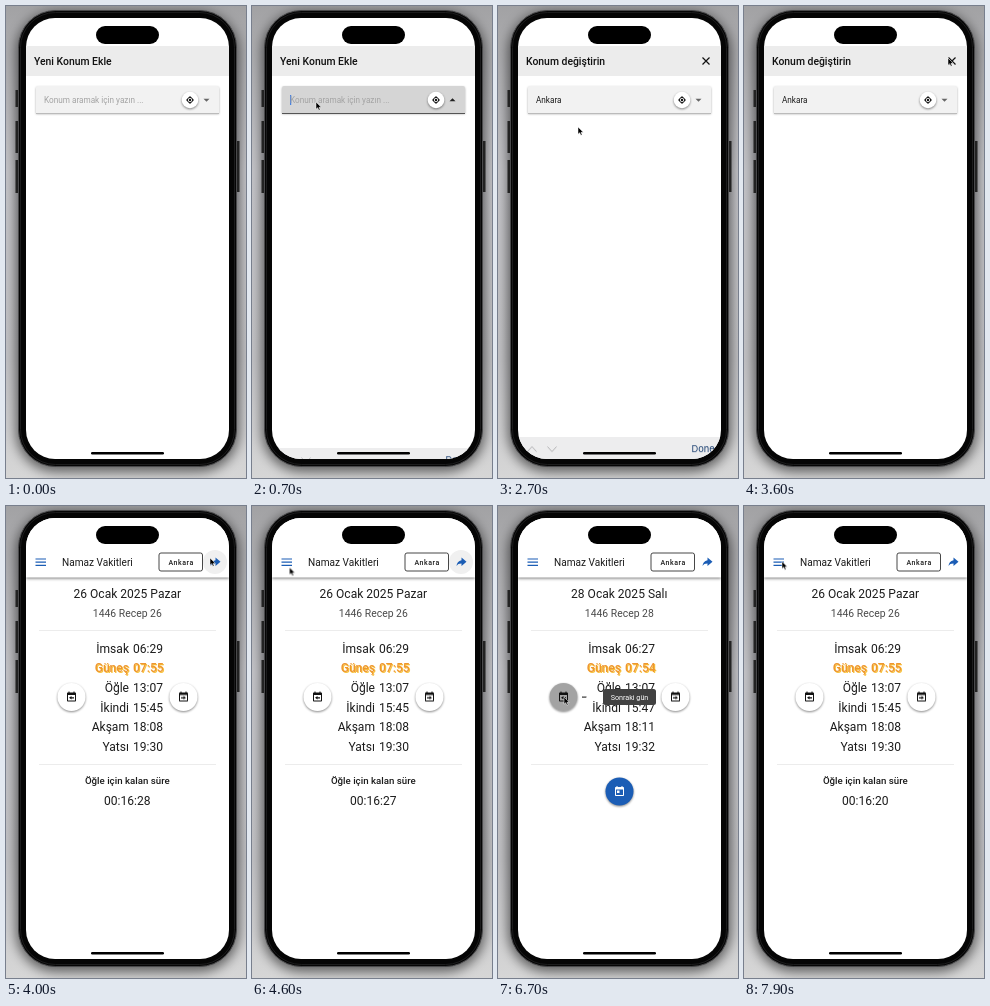
Write an HTML page that moves like this. It is 240 by 472 pixels and loops after 8000 ms.

```html
<!DOCTYPE html>
<html lang="tr">
<head>
<meta charset="utf-8">
<title>Namaz Vakitleri</title>
<style>
html, body { margin: 0; width: 100%; height: 100%; overflow: hidden; background: #bcbcc0; }
svg { display: block; }
#stage { width: 240px; height: 472px; }
text { font-family: Roboto, sans-serif; font-size: 8.2px; fill: #1c1c1c; white-space: pre; }
.mid { text-anchor: middle; }
.end { text-anchor: end; }
.title { font-size: 10.4px; font-weight: 500; fill: #111; }
.big { font-size: 12.05px; }
.sub { font-size: 6.9px; fill: #777; }
.tip { font-size: 7.2px; fill: #fff; }
.sun { font-weight: 500; fill: #ee9630; filter: drop-shadow(1px 1px .3px #f8c23c); }
.lift { filter: drop-shadow(0 1px 1.2px #0007); }
.rule { stroke: #ececec; }

/* on/off switches and moving parts share one 8 s clock */
.cut { animation: 8s step-end infinite; }
.move { animation: 8s linear infinite; }

#pick { animation-name: pick; }
@keyframes pick { 0% { opacity: 1 } 48.75%, 100% { opacity: 0 } }
#times { animation-name: times; }
@keyframes times { 0% { opacity: 0 } 48.75%, 100% { opacity: 1 } }
#add, #hint { animation-name: add; }
@keyframes add { 0% { opacity: 1 } 33.4%, 100% { opacity: 0 } }
#hint { animation-name: hint; }
@keyframes hint { 0% { opacity: 1 } 12.5%, 100% { opacity: 0 } }
#change { animation-name: change; }
@keyframes change { 0% { opacity: 0 } 33.4%, 100% { opacity: 1 } }
#typed { animation-name: typed; }
@keyframes typed { 0% { opacity: 0 } 12.5%, 100% { opacity: 1 } }
.focus { animation-name: focus; }
@keyframes focus { 0% { opacity: 0 } 7.5% { opacity: 1 } 33.4%, 100% { opacity: 0 } }
#list { animation-name: list; }
@keyframes list { 0% { opacity: 0 } 15% { opacity: 1 } 33.4%, 100% { opacity: 0 } }
#cover { animation-name: cover; }
@keyframes cover {
  0% { transform: translateX(0) } 12.5% { transform: translateX(5.4px) }
  13.75% { transform: translateX(9.9px) } 15.4% { transform: translateX(14.1px) }
  17.5% { transform: translateX(18.5px) } 19.4% { transform: translateX(21.3px) }
  21.2%, 100% { transform: translateX(25.8px) }
}
#caret { animation-name: caret; }
@keyframes caret { 0% { opacity: 1 } 25% { opacity: 0 } 28.1% { opacity: 1 } 31.2%, 100% { opacity: 0 } }
#bar { animation-name: bar; }
@keyframes bar {
  0%, 7.5% { transform: translateY(24px); animation-timing-function: ease-out }
  11.25%, 33.1% { transform: none; animation-timing-function: ease-in }
  36.9%, 100% { transform: translateY(24px) }
}
#halo { animation-name: halo; }
@keyframes halo { 0%, 62.5% { opacity: 1 } 65%, 100% { opacity: 0 } }
#left { animation-name: left; }
@keyframes left { 0%, 68.7% { opacity: 1 } 68.75%, 100% { opacity: 1 } }
#day26 { animation-name: day26; }
@keyframes day26 { 0% { opacity: 1 } 67.5% { opacity: 0 } 91.25%, 100% { opacity: 1 } }
#day27 { animation-name: day27; }
@keyframes day27 { 0% { opacity: 0 } 67.5% { opacity: 1 } 70%, 100% { opacity: 0 } }
#day28 { animation-name: day28; }
@keyframes day28 { 0% { opacity: 0 } 70% { opacity: 1 } 76.25% { opacity: 0 } 82.5% { opacity: 1 } 91.25%, 100% { opacity: 0 } }
#day29 { animation-name: day29; }
@keyframes day29 { 0% { opacity: 0 } 76.25% { opacity: 1 } 82.5%, 100% { opacity: 0 } }
#wait { animation-name: day26; }
#today { animation-name: today; }
@keyframes today { 0% { opacity: 0 } 67.5% { opacity: 1 } 91.25%, 100% { opacity: 0 } }
#ticks { animation: ticks 8s steps(16) -7.7s infinite; }
@keyframes ticks { to { transform: translateY(-320px) } }
#nextRip { animation-name: nextRip; }
@keyframes nextRip { 0%, 66.8% { opacity: 0 } 68.2%, 79% { opacity: .24 } 81.5%, 100% { opacity: 0 } }
#prevRip { animation-name: prevRip; }
@keyframes prevRip { 0%, 81.5% { opacity: 0 } 83%, 92% { opacity: .36 } 95.5%, 100% { opacity: 0 } }
#nextTip { transform-origin: 158px 191px; animation-name: nextTip; }
@keyframes nextTip {
  0%, 67% { transform: scale(0); opacity: 1 } 69%, 84% { transform: none; opacity: 1 }
  85.5%, 100% { transform: none; opacity: 0 }
}
#prevTip { transform-origin: 84px 191px; animation-name: prevTip; }
@keyframes prevTip {
  0%, 83.6% { transform: scale(0); opacity: 1 } 85.5%, 94% { transform: none; opacity: 1 }
  96%, 100% { transform: none; opacity: 0 }
}
#cursor { animation: cursor 8s ease-in-out infinite; }
@keyframes cursor {
  0%, 1% { transform: translate(-12px, 128px) }
  6.25%, 23.5% { transform: translate(64px, 96px) }
  31%, 41% { transform: translate(80px, 121px) }
  44%, 52% { transform: translate(204px, 52px) }
  56.25%, 63% { transform: translate(37.5px, 61.5px) }
  66.5%, 78% { transform: translate(178.5px, 188px) }
  81.5%, 96.5% { transform: translate(66px, 191px) }
  98.2%, 100% { transform: translate(38px, 55.5px) }
}
</style>
</head>
<body>
<svg id="stage" viewBox="0 0 240 472">
  <defs>
    <linearGradient id="wall" x2="0" y2="1">
      <stop offset="0" stop-color="#a2a2a4"/><stop offset=".35" stop-color="#c4c4c8"/>
      <stop offset=".75" stop-color="#c2c2c5"/><stop offset="1" stop-color="#d6d6d6"/>
    </linearGradient>
    <filter id="blur" x="-20%" y="-20%" width="140%" height="140%"><feGaussianBlur stdDeviation="6"/></filter>
    <clipPath id="screen"><rect x="20" y="12" width="203" height="441" rx="29"/></clipPath>
    <clipPath id="line"><rect x="90" y="284" width="64" height="20"/></clipPath>
    <path id="cal" d="M19 3h-1V1h-2v2H8V1H6v2H5c-1.1 0-2 .9-2 2v14c0 1.1.9 2 2 2h14c1.1 0 2-.9 2-2V5c0-1.1-.9-2-2-2zm0 16H5V8h14z"/>
    <path id="arrow" d="M7 12.3h5V10l5 3.6-5 3.6V15H7z"/>
  </defs>

  <rect width="240" height="472" fill="url(#wall)"/>
  <rect x="10" y="6" width="223" height="460" rx="40" fill="#000" opacity=".55" filter="url(#blur)"/>
  <path d="M11 84v17M11 115v32M11 154v33M232 135v51" stroke="#222" stroke-width="3"/>
  <rect x="12.5" y="4.5" width="218" height="456" rx="37" fill="#050505" stroke="#4a4a4c"/>
  <rect x="14.5" y="6.5" width="214" height="452" rx="35" fill="none" stroke="#1c1c1d"/>

  <g clip-path="url(#screen)">
    <rect x="20" y="12" width="203" height="441" fill="#fff"/>

    <g id="pick" class="cut">
      <rect x="20" y="40" width="203" height="30" fill="#ececec"/>
      <text id="add" class="title cut" x="28" y="58.5">Yeni Konum Ekle</text>
      <g id="change" class="cut">
        <text class="title" x="28" y="58.5">Konum değiştirin</text>
        <path d="M204.500 51.500l7 7m0-7l-7 7" stroke="#111" stroke-width="1.2"/>
      </g>

      <g style="filter:drop-shadow(0 1px .8px #0005)">
        <path d="M30 107V82q0-2 2-2h179q2 0 2 2v25z" fill="#f2f2f2"/>
      </g>
      <path d="M30 107.500h183" stroke="#bbb"/>
      <g class="focus cut">
        <path d="M30 107V82q0-2 2-2h179q2 0 2 2v25z" fill="#d5d5d5"/>
        <path d="M30 107.500h183" stroke="#555"/>
      </g>
      <text id="typed" class="cut" x="38" y="96.700">Ankara</text>
      <g class="focus cut">
        <g id="cover" class="cut">
          <rect x="38.200" y="86" width="32" height="16" fill="#d5d5d5"/>
          <path id="caret" class="cut" d="M38.700 89v10" stroke="#2a6fe0"/>
        </g>
      </g>
      <text id="hint" class="cut" x="38" y="96.700" style="fill:#a3a3a3">Konum aramak için yazın ...</text>

      <circle class="lift" cx="184" cy="94" r="8.300" fill="#fff"/>
      <circle cx="184" cy="94" r="2.600" fill="none" stroke="#111"/>
      <circle cx="184" cy="94" r="1.200" fill="#111"/>
      <path d="M184 90v1.500m0 5V98m-4-4h1.500m5 0h1.500" stroke="#111" stroke-width=".9"/>
      <path id="add2" d="M197.500 92.700h6l-3 3z" fill="#666"/>
      <g class="focus cut">
        <rect x="196" y="91" width="9" height="6" fill="#d5d5d5"/>
        <path d="M197.500 95.300h6l-3-3z" fill="#222"/>
      </g>

      <g id="list" class="cut">
        <rect class="lift" x="30" y="109" width="183" height="80" rx="2" fill="#fff"/>
        <text x="38" y="123">Ankara, Ankara</text>
        <text class="sub" x="38" y="132.500">Turkiye</text>
        <path d="M64.500 127.500q2-1 4.500 0t4 0v5.500q-2 1-4 0t-4.500 0z" fill="#c8663a"/>
        <circle cx="68" cy="130.200" r="1.300" fill="#f2d9c8"/>
        <text x="38" y="147.200">Ankaran, Ankaran</text>
        <text class="sub" x="38" y="156.800">Slovenya</text>
        <text x="38" y="171.400">Ankaran, Ankaran Municipality</text>
        <text class="sub" x="38" y="181">Slovenya</text>
        <g id="flag">
          <path d="M69.500 152.500h8.500" stroke="#c9c9d2" stroke-width="2"/>
          <path d="M69.500 154.500h8.500" stroke="#3560b0" stroke-width="2"/>
          <path d="M69.500 156.500h8.500" stroke="#c4585a" stroke-width="2"/>
        </g>
        <use href="#flag" y="24.200"/>
      </g>

      <g id="bar" class="move">
        <rect x="20" y="430" width="203" height="24" fill="#ededee"/>
        <path d="M29.500 444.500l4.500-5 4.500 5M49.500 439.500l4.500 5 4.500-5" fill="none" stroke="#b4b4b6"/>
        <text x="193.500" y="445" style="font:9.300px Inter,sans-serif;fill:#1b3f70">Done</text>
      </g>
    </g>

    <g id="times" class="cut">
      <rect x="20" y="40" width="203" height="31.500" fill="#fff" style="filter:drop-shadow(0 1px 1.500px #0008)"/>
      <rect x="20" y="12" width="203" height="30" fill="#fff"/>
      <path d="M29.500 53h10.500m-10.500 3.200h10.500m-10.500 3.200h10.500" stroke="#1b5db5" stroke-width="1.200"/>
      <text x="56" y="59.500" style="font-size:10.100px">Namaz Vakitleri</text>
      <rect x="153" y="47" width="43.500" height="18" rx="2" fill="#fff" stroke="#333" stroke-width=".9"/>
      <text class="mid" x="175.200" y="58.600" style="font-size:7px;font-weight:500;letter-spacing:.6px">Ankara</text>
      <circle id="halo" class="move" cx="209" cy="56" r="12" fill="#f0f0f0"/>
      <path d="M209.500 51.500l5 4.300-5 4.300v-2.600c-2.600 0-4 .8-5 2.500.3-2.700 1.900-5.300 5-5.800z" fill="#1b5db5"/>

      <path class="rule" d="M33 124.500h177M33 258.500h177"/>
      <g id="rows"></g>

      <g id="wait" class="cut">
        <text class="mid" x="121.300" y="278" style="font-size:9.700px;font-weight:500">Öğle için kalan süre</text>
        <g clip-path="url(#line)"><g id="ticks"></g></g>
      </g>
      <g id="today" class="cut">
        <circle class="lift" cx="121.500" cy="285.500" r="14" fill="#1b5db5"/>
        <g transform="translate(115.500 279.500) scale(.5)" fill="#fff"><use href="#cal"/><path d="M7 10h5v5H7z"/></g>
      </g>

      <circle class="lift" cx="65.500" cy="191" r="14" fill="#fff"/>
      <circle id="prevRip" class="move" cx="65.500" cy="191" r="14"/>
      <g transform="translate(59.500 185) scale(.5)" fill="#111"><use href="#cal"/><use href="#arrow" transform="matrix(-1 0 0 1 24 0)"/></g>
      <circle class="lift" cx="177.500" cy="191" r="14" fill="#fff"/>
      <circle id="nextRip" class="move" cx="177.500" cy="191" r="14"/>
      <g transform="translate(171.500 185) scale(.5)" fill="#111"><use href="#cal"/><use href="#arrow"/></g>

      <g id="nextTip" class="move">
        <rect x="105" y="183" width="53" height="16" rx="2.500" fill="#414141"/>
        <text class="tip mid" x="131.500" y="193.500">Sonraki gün</text>
      </g>
      <g id="prevTip" class="move">
        <rect x="84" y="183" width="51" height="16" rx="2.500" fill="#414141"/>
        <text class="tip mid" x="109.500" y="193.500">Önceki gün</text>
      </g>
    </g>

    <rect x="90" y="20" width="63" height="18" rx="9" fill="#000"/>
    <rect x="85" y="446" width="73" height="2.600" rx="1.300" fill="#000"/>
  </g>

  <path id="cursor" d="M0 0v7.200l1.700-1.500 1.200 2.600 1.200-.6-1.100-2.400h2.300z" fill="#000" stroke="#fff" stroke-width=".5"/>
</svg>
<script>
const $ = id => document.getElementById(id);
const text = (cls, x, y, s) => `<text class="${cls}" x="${x}" y="${y}">${s}</text>`;
const column = (cls, x, list) => list.map((s, i) =>
  text(`big ${cls} ${i === 1 ? 'sun' : ''}`, x, 146.8 + i * 19.6, s)).join('');

const days = {
  26: ['Pazar', '06:29 07:55 13:07 15:45 18:08 19:30'],
  27: ['Pazartesi', '06:28 07:54 13:07 15:46 18:09 19:31'],
  28: ['Salı', '06:27 07:54 13:07 15:47 18:11 19:32'],
  29: ['Çarşamba', '06:27 07:53 13:07 15:48 18:12 19:33']
};
const names = ['İmsak', 'Güneş', 'Öğle', 'İkindi', 'Akşam', 'Yatsı'];

$('rows').innerHTML = column('end', 123, names) +
  Object.entries(days).map(([n, [day, list]]) => `<g id="day${n}" class="cut">` +
    text('big mid', 121.3, 92, `${n} Ocak 2025 ${day}`) +
    `<g style="opacity:.8">${text('mid lunar', 121.3, 111.3, `1446 Recep ${n}`)}</g>` +
    column('', 127, list.split(' ')) + '</g>').join('');
document.querySelectorAll('.lunar').forEach(e => e.style.fontSize = '10.4px');

$('ticks').innerHTML = Array.from({ length: 16 }, (_, i) =>
  text('big mid', 121.3, 299.3 + i * 20, `00:16:${35 - i}`)).join('');
</script>
</body>
</html>
```
